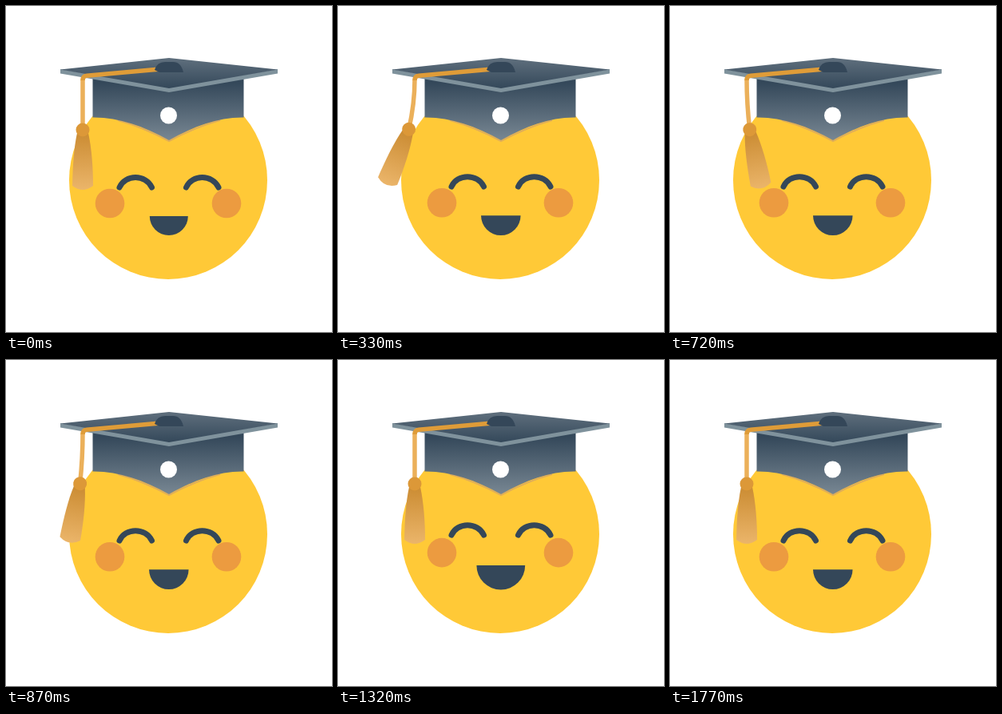
An HTML page that plays this animation: 408x408 px, repeating every 1.8 s.

```html
<!DOCTYPE html>
<html lang="en">
<head>
<meta charset="utf-8">
<title>Graduate smiley</title>
<style>
  html, body { margin: 0; width: 100%; height: 100%; overflow: hidden; background: #fff; }
  svg { display: block; width: 100vw; height: 100vh; }
</style>
</head>
<body>
<svg viewBox="0 0 408 408">
  <defs>
    <linearGradient id="board" x2="0" y2="1">
      <stop stop-color="#5f6f7d"/><stop offset="1" stop-color="#34485a"/>
    </linearGradient>
    <linearGradient id="band" x2="0" y2="1">
      <stop offset=".1" stop-color="#34485a"/><stop offset="1" stop-color="#788793"/>
    </linearGradient>
    <linearGradient id="fringe" x2="0" y2="1">
      <stop stop-color="#cb8c33"/><stop offset="1" stop-color="#ebb56a"/>
    </linearGradient>
  </defs>

  <circle cx="203" cy="218" r="124" fill="#ffc937"/>
  <g id="cheeks" fill="#ec9b40">
    <circle cx="130" cy="247" r="18.3"/>
    <circle cx="276" cy="247" r="18.3"/>
  </g>
  <g id="eyes" fill="none" stroke="#344759" stroke-width="7" stroke-linecap="round">
    <path d="M142 227C149 210.500 175 210.500 182.500 227"/>
    <path d="M225.500 227C232.500 210.500 258.500 210.500 266 227"/>
  </g>
  <path id="mouth" fill="#344759"/>

  <path d="M140 143Q170 151 204 169Q238 151 268 143" fill="none" stroke="#e0ae58" stroke-width="2"/>
  <path d="M108.500 88H297.500V139.500C266 139 236 150 204 168C172 150 140 139 108.500 139.500Z" fill="url(#band)"/>
  <path d="M68 79L204 102L340 79V84.500L204 108L68 84.500Z" fill="#7f929c"/>
  <path d="M68 79.500L204 65L340 79.500L204 103Z" fill="url(#board)"/>
  <circle cx="203.500" cy="137" r="10.500" fill="#fff"/>

  <g fill="none" stroke-width="5.500">
    <path id="cord" stroke="#ebb05a"/>
    <path d="M190 79.300L101 87.300Q96 87.800 96 93" stroke="#df9c38"/>
  </g>
  <path d="M186 80Q189 70 199 70H209Q219 70 222 83H192Z" fill="#344759"/>
  <g id="tassel">
    <path d="M-7 4C-11 22 -12.500 46 -13 70Q0 80 13 70C13 46 11 22 7 4Z" fill="url(#fringe)"/>
    <circle r="8.500" fill="#dc9838"/>
  </g>
</svg>
<script>
  const LOOP = 1800;
  const el = id => document.getElementById(id);
  const set = (id, name, value) => el(id).setAttribute(name, value);

  // [time, value] pairs
  const swing = [[0, 0], [300, -23.5], [600, 23.5], [900, -11], [1200, 0], [LOOP, 0]];
  const smile = [[0, 0], [60, .12], [1020, .12], [1350, 1], [1620, 1], [1770, .12], [LOOP, 0]];

  function ease(keys, t) {
    const i = keys.findIndex(k => k[0] > t);
    const [t0, a] = keys[i - 1], [t1, b] = keys[i];
    return a + (b - a) * (1 - Math.cos(Math.PI * (t - t0) / (t1 - t0))) / 2;
  }

  function draw(t) {
    const angle = ease(swing, t), p = ease(smile, t);
    const x = 96 + angle * .33, y = 155 - Math.abs(angle) * .03;
    set("cord", "d", `M96 92Q96 122 ${x} ${y}`);
    set("tassel", "transform", `translate(${x} ${y}) rotate(${-angle})`);

    set("cheeks", "transform", `translate(0 ${-6 * p})`);
    set("eyes", "transform", `translate(0 ${-8 * p})`);
    const r = 24 + 6.5 * p, top = 263 - 6 * p;
    set("mouth", "d", `M${203.8 - r} ${top}a${r} ${r} 0 0 0 ${2 * r} 0Z`);
  }

  const start = performance.now();
  function frame() {
    draw((performance.now() - start) % LOOP);
    requestAnimationFrame(frame);
  }
  frame();
</script>
</body>
</html>
```
